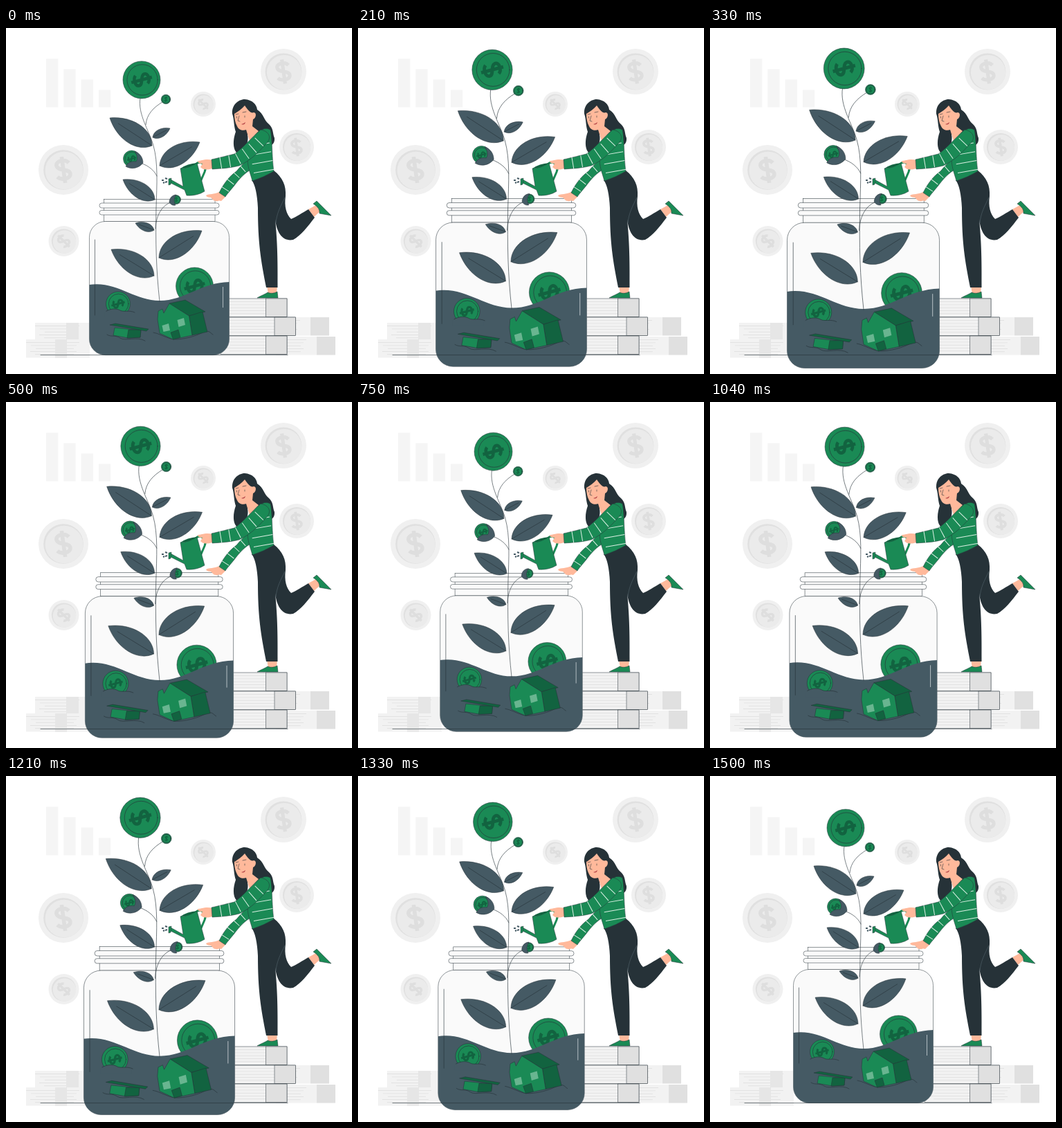
An HTML page for the animation above (1.54 s loop, 500 by 500 pixels).

```html
<!DOCTYPE html>
<html lang="en">
<head>
<meta charset="utf-8">
<title>Growing savings</title>
<style>
html, body { margin: 0; width: 100%; height: 100%; overflow: hidden; background: #fff; }
svg { display: block; width: 100vw; height: 100vh; }
.ink { fill: none; stroke: #263238; stroke-width: .6; stroke-linecap: round; }
.line { stroke: #263238; stroke-width: .5; }
.green { fill: #1a8a55; }
.deep { fill: #126340; }
.slate { fill: #455a64; }
.dark { fill: #263238; }
.skin { fill: #ffb99b; }
.glass { fill: #fafafa; }
.stripes { fill: none; stroke: #d9efe2; stroke-dasharray: 1 12; }
</style>
</head>
<body>
<svg viewBox="0 0 500 500">
  <defs>
    <path id="dollar" d="M8-8C4-14-9-13-8-6C-7 1 8-1 8 6C8 13-5 13-9 8M0-17V17" fill="none" stroke-width="5"/>
    <rect id="body" x="120.500" y="279.500" width="202" height="193" rx="23"/>
    <clipPath id="inside"><use href="#body"/></clipPath>
  </defs>

  <g id="backdrop"></g>
  <g id="books"></g>

  <g id="growth">
    <rect class="glass line" x="141.500" y="247.500" width="160.500" height="32"/>
    <rect class="glass line" x="135" y="253" width="173" height="7" rx="3.500"/>
    <rect class="glass line" x="135" y="263.500" width="173" height="6.500" rx="3.200"/>
    <use href="#body" class="glass line"/>
    <g id="buried"></g>
    <path class="slate" clip-path="url(#inside)" d="M120 371C160 365 185 394 222 394S280 368 323 367V473H120Z"/>
    <path class="ink" d="M128.500 306V415"/>
    <path stroke="#dfe5e8" stroke-width=".7" d="M313.500 374V404"/>

    <path class="ink" d="M222 395C217 350 216 310 217 260C218 225 220 195 213 170C207 148 190 125 194 101M202 140C203 125 213 115 226 107M218 214C214 205 205 199 197 196M216 290C217 268 227 256 238 252"/>
    <g id="leaves"></g>
    <g id="coins"></g>
    <path class="slate line" d="M186 178C194 181 198 188 198 195C192 203 181 205 173 200C176 195 180 192 188 193C191 188 189 183 186 178Z"/>
    <path class="slate line" d="M236 252C236 245 241 241 246 241C243 246 242 250 245 256C241 257 238 255 236 252Z"/>

    <path class="slate" d="M143 410C152 405 160 405 165 408S178 407 184 411V418H143Z"/>
    <path class="ink" d="M145 409C152 405 160 405 165 408S178 407 186 411M146 443C152 447 158 443 165 448S190 445 201 452M213 440C220 441 228 446 238 449S270 447 282 441S294 440 299 443"/>
    <path class="green line" d="M157 433L155 444L177 448L194 447L195 437Z"/>
    <path class="deep line" d="M177 436L175 448L194 447L195 436Z"/>
    <path class="deep line" d="M150 429L158 427L206 435L203 438Z"/>

    <path class="deep line" d="M236 398L259 393L288 410L264.500 416Z"/>
    <path class="deep line" d="M264.500 416L284 410L291 439L269 444Z"/>
    <path class="green line" d="M220 409L226 406L228 412L236 398L264.500 416L269 444L241.500 450L222 441L219 421Z"/>
    <path fill="#69b590" d="M225.500 430L235 427L237 437L227.500 439ZM247.500 422L257 419L259 429L249.500 432Z"/>
    <path class="deep line" d="M238 440L249 436L252 447L241.500 450Z"/>
  </g>

  <path class="ink" d="M50 472.500H407"/>

  <g id="gardener">
    <path class="dark" d="M327 124C326 109 338 103 345 103C356 104 362 110 363 118C373 124 372 133 380 139C387 146 385 152 388 159C389 168 382 172 374 171L357 152L349 154C352 168 342 180 336 182C328 178 327 164 332 150C329 142 330 133 327 124Z"/>
    <path class="skin" d="M330 124C335 121 341 117 345 112C350 119 354 124 358 122C363 122 361 131 357 132L356 142L365 149L352 163L347 147C342 149 336 147 334 142C331 137 330 130 330 124Z"/>
    <path class="ink" d="M332 125L336 124M342 122L347 121M337 127L335 134L338 135M333.500 128V130M345 127V129"/>
    <path d="M340 139Q344 138 346 136Q345 141 340 139Z" fill="#b8494b"/>

    <path class="skin" d="M437 262L448 256L455 264L445 273Z"/>
    <path class="green line" d="M444 254L449 250L470 271L453 268Q454 260 444 254Z"/>
    <path class="skin" d="M377 373H392L391 384H379Z"/>
    <path class="green line" d="M363 390C370 386 376 384 378 382Q385 385 392 381L393 390Z"/>
    <path class="dark" d="M355 220L387 206C400 216 405 228 404 243C402 258 405 269 412 276C420 273 428 267 437 262L446 274C436 287 426 300 415 306C400 309 391 296 389 276C391 298 393 320 392.500 375H376C368 335 364 310 364 260C363 240 360 226 355 220Z"/>
    <path fill="none" stroke="#52636c" stroke-width=".6" d="M403 245C397 257 391 268 390 282"/>

    <path class="skin" d="M317 244L308 237C300 241 294 239 289 242Q290 245 296 245L300 249C305 252 307 248 311 250Z"/>
    <path class="green line" d="M308 238C315 224 323 214 333 207C340 199 345 193 355 186L361 202C349 205 340 215 332 225C326 233 320 239 317 244Z"/>
    <path class="stripes" stroke-width="12" stroke-dashoffset="-9" d="M312 241C322 224 334 209 350 197"/>
    <path class="green line" d="M364 151Q374 142 382 147C385 158 384 185 387 207Q374 215 356 221C353 210 350 204 349 191Z"/>
    <path class="stripes" stroke-width="30" d="M366 168L374 214"/>

    <path d="M274 197C281 190 291 198 287 208L281 222" fill="none" stroke="#1a8a55" stroke-width="3"/>
    <path class="green line" d="M252 203C260 203 268 199 276 195L287 236Q276 243 261 242L258 234L236 223L238 219L256 229Z"/>
    <path class="deep" d="M252 203Q262 196 276 195Q268 202 252 203Z"/>
    <path class="green line" d="M235 218L239 217L238 226L235 227Z"/>
    <path stroke="#455a64" stroke-width="2" d="M230 217l3 1M225 220l3 0M230 223l3-1M227 224l2-1"/>
    <path class="skin" d="M298 191C290 188 281 192 277 192Q277 196 284 196L281 201Q286 207 298 203Z"/>
    <path class="green line" d="M297 190C310 187 322 184 330 182C343 173 353 160 368 147C380 149 386 159 374 169C364 181 352 192 337 199C322 203 310 203 298 204Z"/>
    <path class="stripes" stroke-width="17" stroke-dashoffset="-12" d="M298 197L328 192Q350 183 372 158"/>
  </g>
</svg>
<script>
const el = id => document.getElementById(id);
const times = (n, make) => Array.from({ length: n }, (_, i) => make(i)).join('');
const rect = (x, y, w, h, fill, cls = '') =>
  `<rect x="${x}" y="${y}" width="${w}" height="${h}" fill="${fill}" class="${cls}"/>`;
const circle = (x, y, r, attrs) => `<circle cx="${x}" cy="${y}" r="${r}" ${attrs}/>`;
const dollar = (x, y, size, turn, color) =>
  `<use href="#dollar" stroke="${color}" transform="translate(${x} ${y}) rotate(${turn}) scale(${size})"/>`;

const paleCoin = (x, y, r, turn = -8) =>
  circle(x, y, r, 'fill="#f0f0f0"') + circle(x, y, r * .8, 'fill="#e0e0e0"') +
  circle(x + 1, y + 1, r * .76, 'fill="#ebebeb"') + dollar(x, y, r / 32, turn, '#dedede');

const coin = (x, y, r, turn = 75) =>
  circle(x, y, r, 'class="green line"') + circle(x + r * .04, y, r * .82, 'class="ink"') +
  dollar(x, y, r / 30, turn, '#126340');

// Leaf from base to tip, its width in proportion to its length.
function leaf(bx, by, tx, ty) {
  const dx = tx - bx, dy = ty - by;
  const at = (f, side) => `${bx + dx * f - dy * side} ${by + dy * f + dx * side}`;
  return `<path class="slate line" d="M${bx} ${by}C${at(.18, .28)} ${at(.65, .28)} ${tx} ${ty}C${at(.65, -.28)} ${at(.18, -.28)} ${bx} ${by}"/>
    <path class="ink" d="M${bx} ${by}L${at(.8, 0)}"/>`;
}

// Bundle of paper with a band; outlined when it stands in front.
const bundle = (x, y, w, bandX, bandW, band, cls = '') =>
  rect(x, y, w, 26.5, '#f2f2f2', cls) +
  times(5, i => rect(x + i * 7 % 15, y + 4.3 * (i + 1), w - i * 11 % 23 - 15, .6, '#d9d9d9')) +
  rect(bandX, y, bandW, 26.5, band, cls);

el('backdrop').innerHTML =
  times(4, i => rect(58 + 25.3 * i, 44.5 + 15 * i, 17.3, 70 - 15 * i, '#f5f5f5')) +
  paleCoin(83, 205, 36) + paleCoin(401, 63, 33) + paleCoin(420, 172, 25) +
  paleCoin(285, 110, 18, -45) + paleCoin(83.5, 308, 22, -45) +
  bundle(42, 426, 79, 87, 18, '#e6e6e6') + bundle(29, 450, 92, 71, 17, '#e6e6e6') +
  bundle(390, 418, 50, 440, 27, '#e0e0e0') + bundle(390, 446, 59, 449, 27, '#e0e0e0');

el('books').innerHTML = times(3, i => {
  const right = i === 1 ? 418.5 : 406;
  return bundle(310, 391 + 27 * i, right - 310, right - 30.5, 30.5, '#e0e0e0', 'line');
});

el('buried').innerHTML = coin(272.5, 373, 27);
el('leaves').innerHTML =
  leaf(211, 170, 150, 130) + leaf(212, 158, 237, 145) + leaf(222, 199, 280, 165) +
  leaf(215, 248, 169, 219) + leaf(214, 292, 187, 282) + leaf(221, 332, 283, 293) + leaf(214, 358, 152, 320);
el('coins').innerHTML =
  coin(196, 75, 27) + coin(231, 103, 6.8, 10) + coin(181.5, 189, 12) +
  coin(246, 248, 6.5, 10) + coin(162, 398.5, 17.5);

// Linear rise to 1 at the peak, then linear fall.
const beat = (t, start, peak, end) =>
  Math.max(0, Math.min((t - start) / (peak - start), (end - t) / (end - peak)));

const growth = el('growth');
function frame() {
  const t = performance.now() % 1540;
  const scale = 1 + .1 * (beat(t, 0, 268, 855) + beat(t, 920, 1138, 1500));
  growth.setAttribute('transform', `translate(221.5 260) scale(${scale}) translate(-221.5 -260)`);
  requestAnimationFrame(frame);
}
frame();
</script>
</body>
</html>
```
